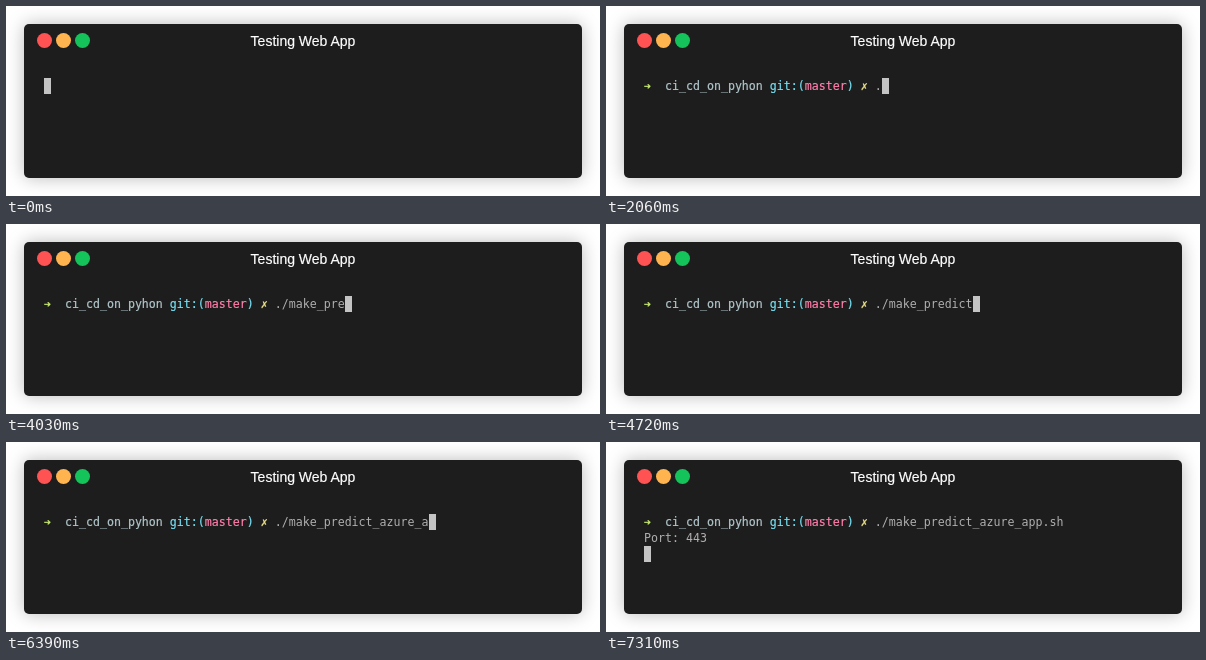
These frames come from a looping animation (594 px wide and 190 px high, 8000 ms). An HTML page:

```html
<!DOCTYPE html>
<html lang="en">
<head>
<meta charset="utf-8">
<title>Testing Web App</title>
<style>
  html, body { margin: 0; width: 100%; height: 100%; overflow: hidden; background: #fff; }
  #window {
    position: absolute; left: 18px; top: 18px; width: 558px; height: 154px;
    border-radius: 5px; background: #1d1d1d; box-shadow: 0 0 18px #bbb;
  }
  .dot { position: absolute; top: 9px; width: 15px; height: 15px; border-radius: 50%; }
  #title {
    position: absolute; top: 9px; width: 100%; text-align: center; color: #fff;
    font: 14px/16px "Liberation Sans", Arial, sans-serif; -webkit-text-stroke: .2px;
  }
  #screen {
    position: absolute; left: 20px; top: 54px; margin: 0; color: #afafaf;
    font: 11.627px/16px "DejaVu Sans Mono", monospace;
  }
  #prompt { -webkit-text-stroke: .2px; }
  .cell { display: inline-block; width: 7px; height: 16px; vertical-align: top; }
  .arrow { color: #c8ed71; }
  .dir { color: #b1c6ca; }
  .git { color: #75dff2; }
  .branch { color: #ff7fac; }
  .dirty { color: #ebdf86; }
  #cursor { background: #c4c4c4; }
</style>
</head>
<body>
<div id="window">
  <i class="dot" style="left:13px;background:#ff5252"></i>
  <i class="dot" style="left:32px;background:#ffb450"></i>
  <i class="dot" style="left:51px;background:#14c35a"></i>
  <div id="title">Testing Web App</div>
  <pre id="screen"><span id="prompt"><span class="cell arrow">➜</span>  <span class="dir">ci_cd_on_pyhon</span> <span class="git">git:(<span class="branch">master</span>)</span> <span class="cell dirty">✗</span> </span><span id="typed"></span><span class="cell" id="cursor"></span></pre>
</div>
<script>
const LOOP = 8000, PROMPT_AT = 60;
const COMMAND = "./make_predict_azure_app.sh";
// One time per typed character, then Enter, then the program's output.
const KEYS = [
  2060, 2190, 2610, 2840, 2900, 3140, 3560, 3810, 3950, 4030, 4200, 4320, 4510, 4720,
  5140, 5500, 5690, 5830, 5920, 6010, 6210, 6390, 6510, 6670, 6830, 6970, 7080
];
const ENTER_AT = 7200, OUTPUT_AT = 7310;
const promptText = document.getElementById("prompt");
const typed = document.getElementById("typed");

function draw(t) {
  promptText.style.display = t < PROMPT_AT ? "none" : "";
  let text = COMMAND.slice(0, KEYS.filter(key => key <= t).length);
  if (t >= ENTER_AT) text += "\n";
  if (t >= OUTPUT_AT) text += "Port: 443\n";
  if (typed.textContent !== text) typed.textContent = text;
}

const start = performance.now();
function tick() {
  draw((performance.now() - start) % LOOP);
  requestAnimationFrame(tick);
}
tick();
</script>
</body>
</html>
```
